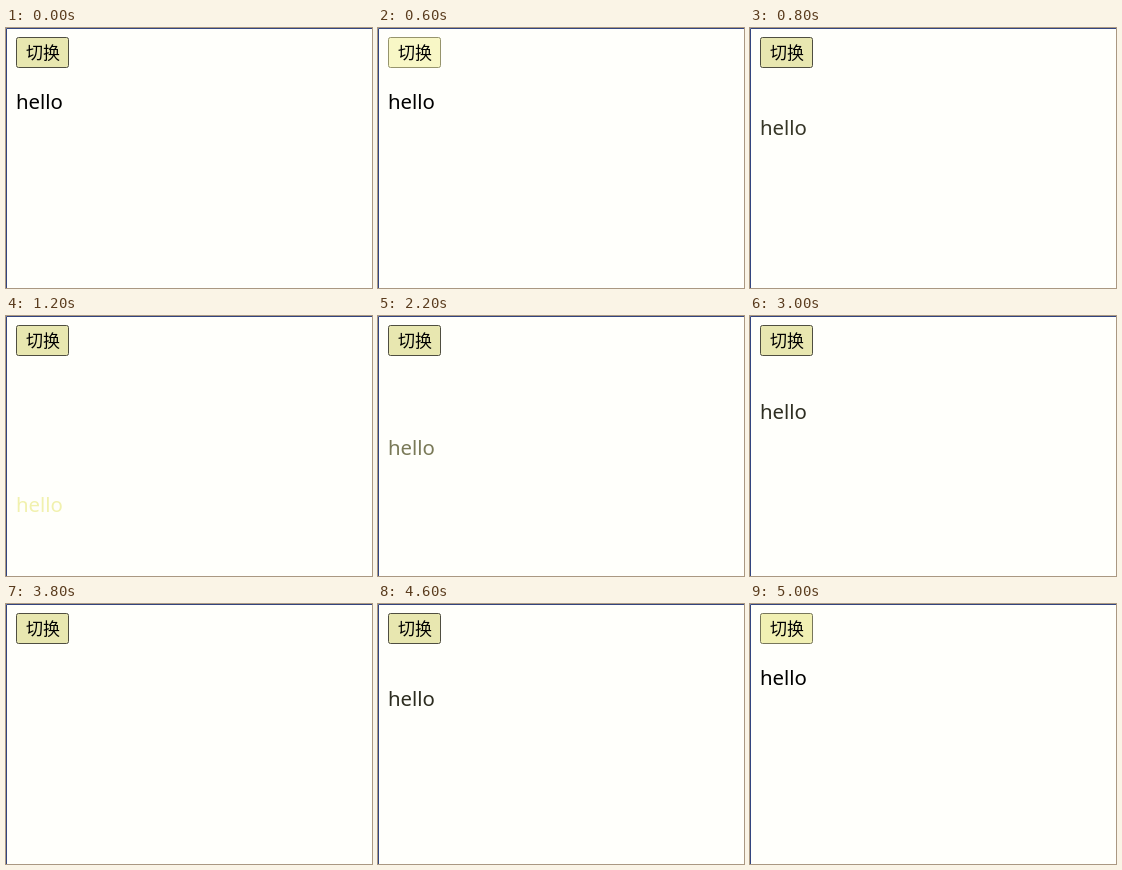
Write an HTML page that moves like this. It is 366x260 px and loops after 5600 ms.

```html
<!DOCTYPE html>
<html lang="zh">
<head>
<meta charset="utf-8">
<title>切换</title>
<style>
  html, body { margin: 0; width: 100%; height: 100%; overflow: hidden; background: #fffffb; }
  svg { display: block; }
  #label { font: 300 17px "Noto Sans CJK SC", "Noto Sans CJK", sans-serif; text-anchor: middle; }
  #hello { font: 20.4px "Noto Sans", "Open Sans", sans-serif; }
</style>
</head>
<body>
<svg width="366" height="260" viewBox="0 0 366 260">
  <path d="M.5 260V.5H366" fill="none" stroke="#33457f"/>
  <rect id="button" x="10.5" y="9.5" width="52" height="30" rx="2"/>
  <text id="label" x="37" y="31">切换</text>
  <text id="hello" x="10" y="81">hello</text>
</svg>
<script>
const LOOP = 5600, STEP = 200, DISTANCE = 125;
const button = document.getElementById('button');
const hello = document.getElementById('hello');

const STYLES = {
  normal: ['#f1f0b3', '#77765a'],
  hover: ['#e8e7b0', '#4f4e40'],
  active: ['#f8f7c6', '#96946c']
};

// Each move slides between rest (0) and fully away (1).
const MOVES = [
  { start: 672, duration: 800, to: 1 },
  { start: 1963, duration: 760, to: 0 },
  { start: 2886, duration: 780, to: 1 },
  { start: 4214, duration: 730, to: 0 }
];

// CSS "ease": cubic-bezier(.25, .1, .25, 1), solved by bisection.
function ease(x) {
  if (x >= 1) return 1;
  let low = 0, high = 1, s;
  for (let i = 0; i < 20; i++) {
    s = (low + high) / 2;
    if (0.75 * s * (1 - s) + s ** 3 < x) low = s; else high = s;
  }
  return 0.3 * s * (1 - s) ** 2 + 3 * (1 - s) * s * s + s ** 3;
}

function awayAt(time) {
  const move = MOVES.filter(m => time >= m.start).pop();
  if (!move) return 0;
  const progress = ease((time - move.start) / move.duration);
  return move.to ? progress : 1 - progress;
}

function buttonState(time) {
  if (time >= 4800) return 'normal';
  const pressed = [600, 2800].some(press => time >= press && time < press + STEP);
  return pressed ? 'active' : 'hover';
}

function draw(now) {
  const time = Math.floor(now % LOOP / STEP) * STEP;
  const [fill, stroke] = STYLES[buttonState(time)];
  button.setAttribute('fill', fill);
  button.setAttribute('stroke', stroke);

  const away = awayAt(time);
  const shade = Math.round(262 * away);
  hello.setAttribute('visibility', away < 0.99 ? 'visible' : 'hidden');
  hello.setAttribute('fill', `rgb(${shade}, ${shade}, ${Math.round(shade * 0.72)})`);
  hello.setAttribute('y', 81 + Math.round(DISTANCE * away));
}

const origin = performance.now();
function tick() {
  draw(performance.now() - origin);
  requestAnimationFrame(tick);
}
tick();
</script>
</body>
</html>
```
